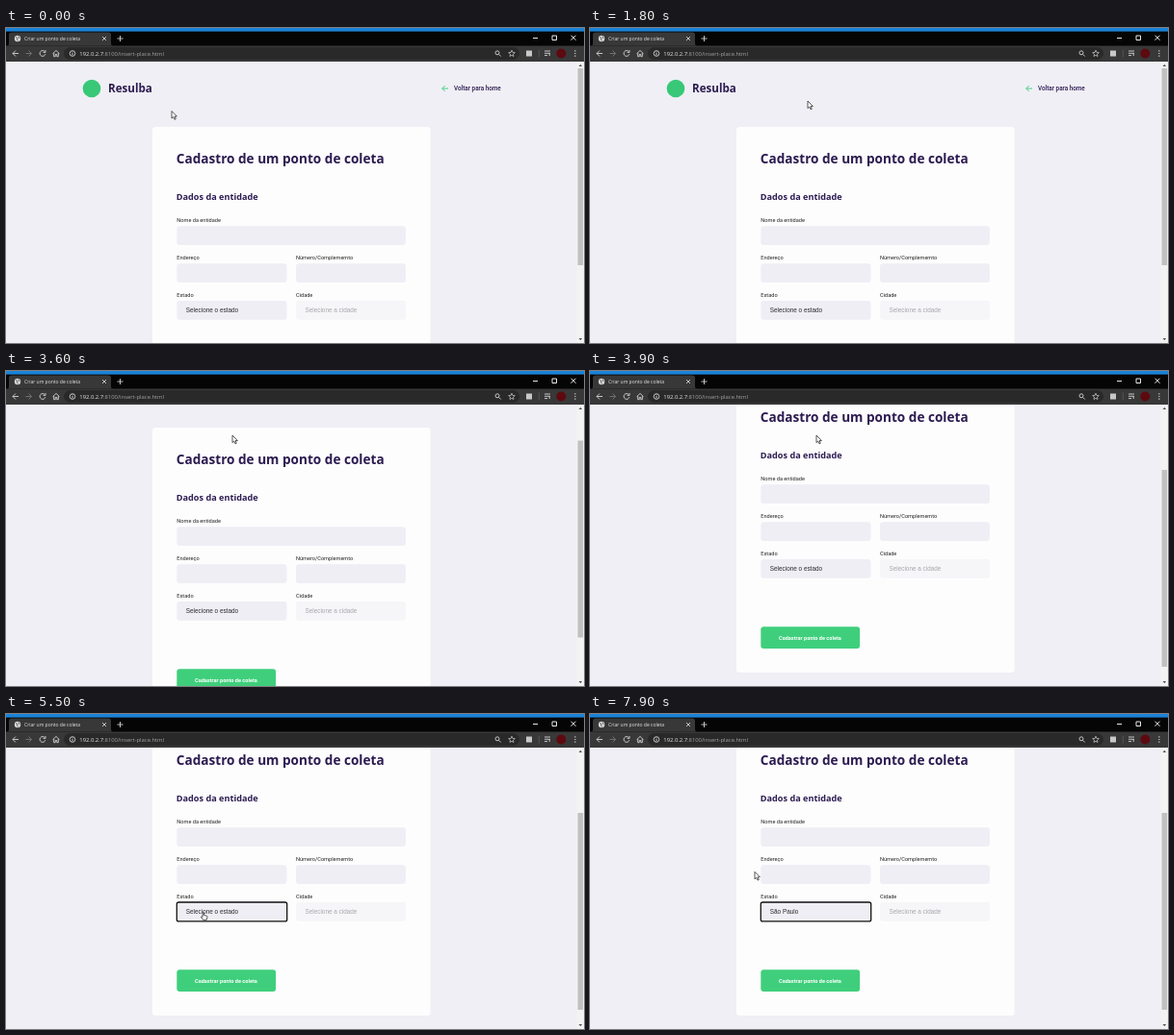
An HTML page that plays this animation: 600 px wide and 328 px high, repeating every 8000 ms.

```html
<!DOCTYPE html>
<html lang="pt-BR">
<head>
<meta charset="utf-8">
<title>Criar um ponto de coleta</title>
<style>
  html, body { margin: 0; width: 100%; height: 100%; overflow: hidden; }
  svg { display: block; width: 100%; height: 100%; }
  text { white-space: pre; }
  .head { font-family: "Noto Sans", sans-serif; font-weight: 700; fill: #2c1b50; }
  .label { font: 5.6px Roboto, sans-serif; fill: #222; }
  .value { font: 6.38px "Liberation Sans", Arial, sans-serif; fill: #2a2a2e; }
  .ui { font-family: "Open Sans", sans-serif; fill: #e8e8e8; }
  .field { fill: #f0eef5; }
  .icon { fill: none; stroke: #d4d4d4; stroke-width: .9; }
  .cursor path { stroke-linejoin: round; }
</style>
</head>
<body>
<svg viewBox="0 0 600 328" preserveAspectRatio="none">
  <rect width="600" height="328" fill="#f0eff5"/>

  <g id="page">
    <circle cx="89" cy="63" r="9.3" fill="#38c878"/>
    <text class="head" x="106" y="67.2" font-size="11.6">Resulba</text>
    <path d="M459 63H452.8M455.7 60L452.7 63L455.7 66" fill="none" stroke="#45cf86"/>
    <text x="465" y="65" font-family="Roboto, sans-serif" font-size="6.35" font-weight="500" fill="#2c1b50">Voltar para home</text>

    <rect x="152" y="103" width="288.5" height="299" rx="3.2" fill="#fdfdfe"/>
    <text class="head" x="176.8" y="141" font-size="13.6">Cadastro de um ponto de coleta</text>
    <text class="head" x="176.8" y="178.6" font-size="9.14">Dados da entidade</text>

    <text class="label" x="177.3" y="202">Nome da entidade</text>
    <rect class="field" x="177.3" y="206.2" width="237.7" height="19.8" rx="3"/>
    <text class="label" x="177.3" y="241">Endereço</text>
    <rect class="field" x="177.3" y="245.2" width="114.2" height="19.8" rx="3"/>
    <text class="label" x="301" y="241">Número/Complememto</text>
    <rect class="field" x="301" y="245.2" width="114" height="19.8" rx="3"/>
    <text class="label" x="177.3" y="279.7">Estado</text>
    <rect class="field" x="177.3" y="284" width="114.2" height="19.8" rx="3"/>
    <rect id="focus" x="177.3" y="284" width="114.4" height="19.9" rx="2" fill="none" stroke="#111" stroke-width="1.3"/>
    <text class="value" id="state" x="186.8" y="296.4"></text>
    <text class="label" x="301" y="279.7">Cidade</text>
    <rect x="301" y="284" width="114" height="19.8" rx="3" fill="#f6f5f8"/>
    <text class="value" x="310.5" y="296.4" style="fill:#a9a8ac">Selecione a cidade</text>

    <rect x="177.3" y="354.2" width="102.8" height="22.8" rx="3" fill="#3fcf7c"/>
    <text x="196" y="367.6" font-family="Roboto, sans-serif" font-size="5.6" font-weight="700" fill="#fff">Cadastrar ponto de coleta</text>
  </g>

  <!-- scrollbar -->
  <rect x="592.5" y="35" width="7.5" height="293" fill="#f3f3f4"/>
  <rect id="thumb" x="593.5" y="42" width="5.6" height="205" fill="#c1c1c2"/>
  <path d="M594.5 40L596.3 37.8L598.1 40ZM594.5 323L596.3 325.2L598.1 323Z" fill="#555"/>

  <!-- browser window -->
  <rect width="600" height="35" fill="#383838"/>
  <rect width="600" height="18.5" fill="#050505"/>
  <rect width="600" height="3.6" fill="#1a83d8"/>
  <path d="M1 18.5Q3 18.5 3 16V7Q3 4.5 6 4.5H106Q109 4.5 109 7V16Q109 18.5 111 18.5Z" fill="#383838"/>
  <circle cx="12" cy="11" r="3.2" fill="#d8d8d8"/>
  <path d="M10 9.5L12 10.5L11.5 12L12.5 13.5M13 8.5L14 11" fill="none" stroke="#555" stroke-width=".8"/>
  <text class="ui" x="19" y="12.9" font-size="5">Criar um ponto de coleta</text>
  <g class="icon">
    <path d="M100 9L104 13M104 9L100 13M118.5 8V14M115.5 11H121.5"/>
    <path d="M547 10.5H552M567 8H571.5V12.5H567ZM586.5 7.7L591.5 12.7M591.5 7.7L586.5 12.7" stroke="#fff"/>
    <path d="M13 26.5H7M10 23.5L7 26.5L10 29.5"/>
    <path d="M20.5 26.5H26.5M23.5 23.5L26.5 26.5L23.5 29.5" stroke="#777"/>
    <path d="M40.3 24.7A2.9 2.9 0 1 0 40.8 27.2M41 23V25.4H38.6"/>
    <path d="M48.5 26.8L52 23.4L55.5 26.8M49.7 26V29.7H51.2V27.5H52.8V29.7H54.3V26"/>
  </g>
  <rect x="60" y="20" width="473" height="13" rx="6.5" fill="#292929"/>
  <g class="icon">
    <circle cx="69" cy="26.5" r="2.8"/>
    <path d="M69 26V28.2M69 24.6V25.3"/>
    <circle cx="510" cy="25.8" r="2"/>
    <path d="M511.5 27.3L513.7 29.5"/>
    <path d="M525 23.2L525.9 25.4L528.3 25.6L526.5 27.2L527 29.5L525 28.3L523 29.5L523.5 27.2L521.7 25.6L524.1 25.4Z" stroke-width=".7"/>
    <path d="M559 24H565M559 26.3H565M559 28.6H562M564.2 29V26.3"/>
  </g>
  <text class="ui" x="76.3" y="28.7" font-size="5.85">192.0.2.7<tspan fill="#a3a3a3">:8100/insert-place.html</tspan></text>
  <rect x="540" y="23.5" width="6" height="6" fill="#c9c9c9"/>
  <path d="M553.3 22.5V30.5" stroke="#666" stroke-width=".6"/>
  <circle cx="576.3" cy="26.5" r="5" fill="#5c0a10"/>
  <path d="M590.8 23.2V24.4M590.8 25.9V27.1M590.8 28.6V29.8" stroke="#d4d4d4" stroke-width="1.2"/>

  <g id="arrow" class="cursor"><path d="M0 0V7.6L1.8 6L3 8.8L4.3 8.2L3.1 5.5H5.4Z" fill="#fff" stroke="#222" stroke-width=".75"/></g>
  <g id="beam" class="cursor"><path d="M-1.9 -3.7H-.6L0 -3.2L.6 -3.7H1.9M0 -3.2V3.2M-1.9 3.7H-.6L0 3.2L.6 3.7H1.9" fill="none" stroke="#222" stroke-width=".9"/></g>
  <g id="hand" class="cursor"><path d="M-.7 .4Q0 -.5 .7 .4V3L3.6 3.7Q4.3 4 4.1 5L3.4 7.8H-.3L-2.3 4.8Q-2 3.9 -.7 4.8Z" fill="#fff" stroke="#222" stroke-width=".75"/></g>
</svg>
<script>
const LOOP = 8000, STEP = 100, SCROLL = 88;
const el = id => document.getElementById(id);
const cursors = ["arrow", "beam", "hand"].map(el);

// time, x, y, and the cursor shown from that time on
const path = [
  [0, 172, 86.5, "arrow"], [600, 188, 84, "arrow"], [700, 188, 84, "arrow"],
  [1000, 203, 81, "arrow"], [1100, 203, 81, "arrow"], [1800, 226, 76, "arrow"],
  [2000, 229, 74, "arrow"], [2700, 236, 69, "arrow"], [3600, 235, 67, "arrow"],
  [3900, 235, 67, "arrow"], [4400, 204, 112, "beam"], [4700, 186, 146, "beam"],
  [4900, 190, 168, "beam"], [5200, 203, 203, "hand"], [5500, 204.8, 206.5, "hand"],
  [5900, 204.8, 206.5, "hand"], [6000, 203, 205, "arrow"], [6100, 198, 202, "arrow"],
  [6400, 211, 187, "arrow"], [6600, 212, 190, "arrow"], [6800, 212, 190, "arrow"],
  [7000, 211, 185.5, "arrow"], [7500, 211, 185.5, "arrow"], [7900, 171, 164.3, "arrow"],
  [8000, 171, 164.3, "arrow"]
];

function smooth(t, from, to) {
  const k = Math.min(1, Math.max(0, (t - from) / (to - from)));
  return k * k * (3 - 2 * k);
}

function pointerAt(t) {
  const i = path.findIndex(p => p[0] > t);
  const [t0, x0, y0, kind] = path[i - 1], [t1, x1, y1] = path[i];
  const k = (t - t0) / (t1 - t0);
  return { x: x0 + (x1 - x0) * k, y: y0 + (y1 - y0) * k, kind };
}

function draw(now) {
  const t = Math.floor(now % LOOP / STEP) * STEP;
  const scroll = SCROLL * smooth(t, 3400, 3800);
  el("page").setAttribute("transform", `translate(0 ${-scroll})`);
  el("thumb").setAttribute("y", 42 + scroll * 61 / SCROLL);
  el("focus").style.display = t >= 5300 ? "" : "none";
  el("state").textContent = t >= 7300 ? "São Paulo" : "Selecione o estado";

  const { x, y, kind } = pointerAt(t);
  for (const c of cursors) {
    c.style.display = c.id === kind ? "" : "none";
    c.setAttribute("transform", `translate(${x} ${y})`);
  }
}

const start = performance.now();
function tick(now) {
  draw(Math.max(0, now - start));
  requestAnimationFrame(tick);
}
draw(0);
requestAnimationFrame(tick);
</script>
</body>
</html>
```
